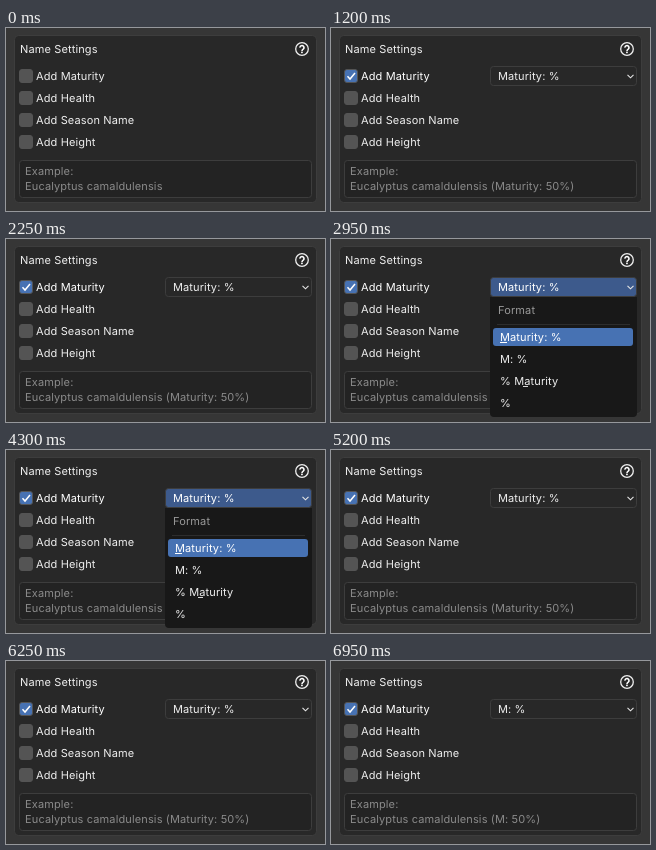
An HTML page that plays this animation: 319x183 px, repeating every 8 s.

```html
<!DOCTYPE html>
<html lang="en">
<head>
<meta charset="utf-8">
<title>Name Settings</title>
<style>
html, body { margin: 0; width: 100%; height: 100%; overflow: hidden; background: #363636; }
svg { display: block; width: 319px; height: 183px; }
text { font: 11px Inter, sans-serif; letter-spacing: .13px; text-rendering: geometricPrecision; fill: #eee; white-space: pre; }
text.dim { fill: #8a8a8a; }
text.head { fill: #989898; }
text.on { fill: #fff; }
</style>
</head>
<body>
<svg id="stage" viewBox="0 0 319 183"></svg>
<script>
const LOOP = 8000;
const STEPS = [
  { at: 0 },
  { at: 1200, format: "Maturity" },
  { at: 2950, format: "Maturity", open: true },
  { at: 5200, format: "Maturity" },
  { at: 6950, format: "M" }
];
const ROWS = ["Maturity", "Health", "Season Name", "Height"];
const stage = document.getElementById("stage");

const box = (x, y, w, h, r, fill, stroke) =>
  `<rect x="${x}" y="${y}" width="${w}" height="${h}" rx="${r}" fill="${fill}"` +
  (stroke ? ` stroke="${stroke}"` : "") + "/>";
const label = (x, y, s, cls = "") => `<text x="${x}" y="${y}" class="${cls}">${s}</text>`;
const line = (d, color, w = 1) =>
  `<path d="${d}" fill="none" stroke="${color}" stroke-width="${w}"/>`;

function help() {
  return `<circle cx="296" cy="21" r="6.3" fill="none" stroke="#eee" stroke-width="1.3"/>` +
    line("M294 19.6a2 2 0 1 1 3.2 1.5q-1.2.8-1.2 1.8", "#fff", 1.6) +
    box(295.1, 23.6, 1.7, 1.6, .4, "#fff");
}

function check(i, on) {
  const y = 42 + i * 22;
  return box(13.5, y - .5, 13, 13, 2.5, on ? "#4772b3" : "#545454", "#545454") +
    (on ? line(`M16.5 ${y + 6.3}l2.5 2.7 5-6`, "#fff", 1.5) : "") +
    label(30, y + 10, "Add " + ROWS[i], on ? "on" : "");
}

function dropdown(format, open) {
  return box(159.5, 38.5, 146, 19, 3, open ? "#3d5a8c" : "#282828", "#3d3d3d") +
    label(167, 52, format + ": %", open ? "on" : "") +
    line("M296.5 46.8l3 3 3-3", "#e6e6e6", 1.1);
}

function menu() {
  return `<path d="M159 58H306V174a4 4 0 0 1-4 4H163a4 4 0 0 1-4-4Z" fill="#181818"/>` +
    label(167, 75, "Format", "head") +
    line("M166 85.5H299", "#2d2d2d") +
    box(162, 89, 140, 18, 3, "#4772b3") +
    ["Maturity: %", "M: %", "% Maturity", "%"].map((s, i) =>
      label(169, 102 + i * 22, s, i ? "" : "on")).join("") +
    line("M169 103.5h7", "#fff") + line("M192 147.5h5", "#d8d8d8");
}

function draw(t) {
  const { format, open } = STEPS.findLast(s => t >= s.at);
  const suffix = format ? ` (${format}: 50%)` : "";
  return box(8.5, 7.5, 302, 167, 4, "#282828", "#3d3d3d") +
    label(14, 25, "Name Settings") + help() +
    ROWS.map((_, i) => check(i, !i && format)).join("") +
    box(13.5, 132.5, 292, 37, 3, "#232323", "#3d3d3d") +
    label(19, 147, "Example:", "dim") +
    label(19, 162, "Eucalyptus camaldulensis" + suffix, "dim") +
    (format ? dropdown(format, open) : "") +
    (open ? menu() : "");
}

let shown = "";
function tick() {
  const picture = draw(performance.now() % LOOP);
  if (picture !== shown) stage.innerHTML = shown = picture;
  requestAnimationFrame(tick);
}
tick();
</script>
</body>
</html>
```
